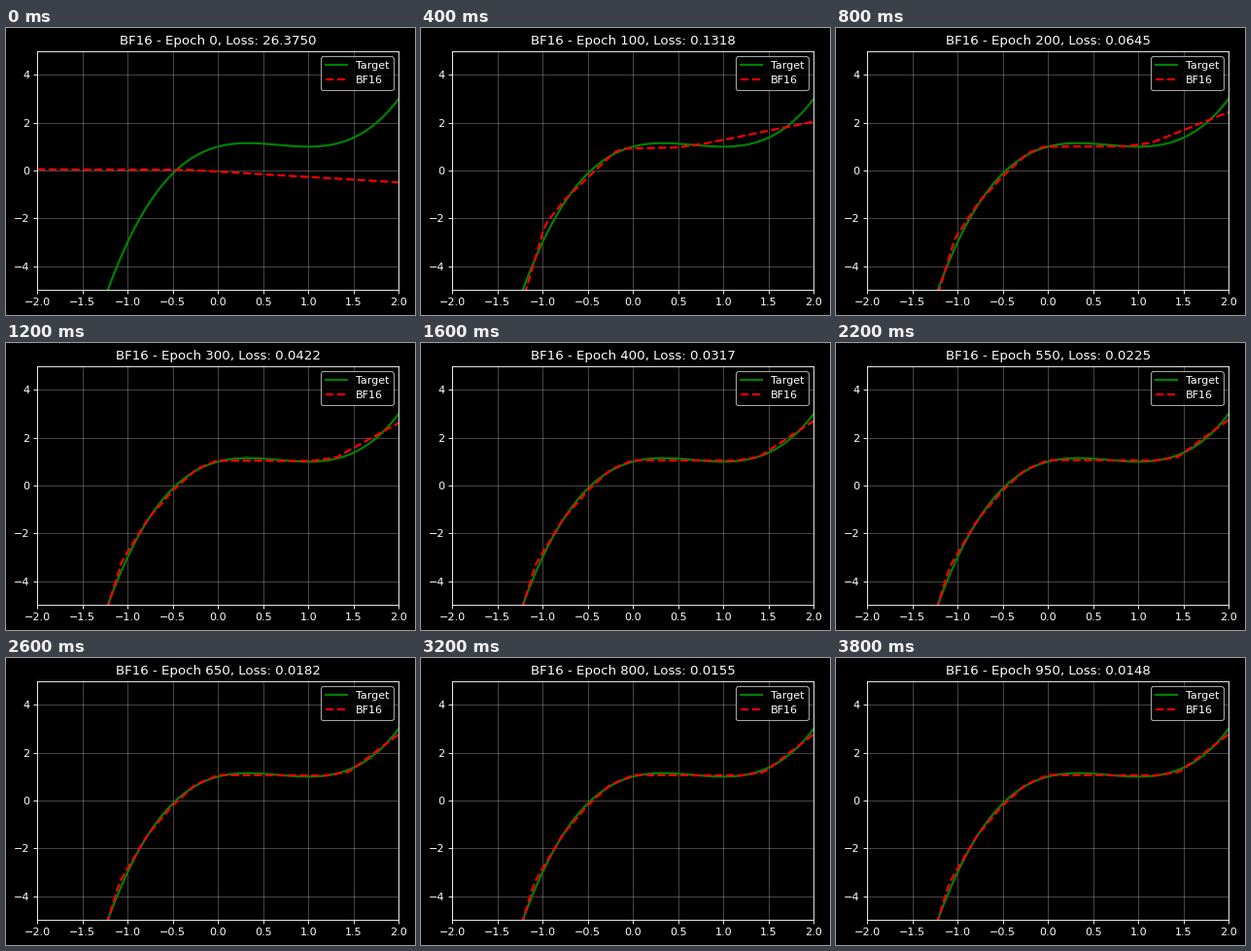
A matplotlib script that plays this animation: 421 by 296 pixels, repeating every 4 s.

```python
import numpy as np
import matplotlib.pyplot as plt
from matplotlib.animation import FuncAnimation

W, H, DPI = 421, 296, 80
FRAMES, STEP = 20, 50

# Loss readings, joined by straight lines on log-log axes
LOSS = {0: 26.375, 100: 0.1318, 300: 0.0422, 500: 0.0253,
        650: 0.0182, 800: 0.0155, 950: 0.0148}

# Kinks of the piecewise-linear fit: rough at epoch 100, then settled
ROUGH = np.array([(-2, -15.5), (-.97, -2.25), (-.75, -1.2), (-.48, -.22), (-.2, .78),
                  (-.1, .92), (.5, .97), (.78, 1.12), (2, 2.05)])
SETTLED = np.array([(-2, -14.6), (-1.09, -3.43), (-.78, -1.44), (-.5, -.2), (-.25, .66),
                    (.01, 1.07), (1.2, 1.05), (1.46, 1.2), (2, 2.78)])

x = np.linspace(-2, 2, 100)
target = x**3 - 2 * x**2 + x + 1
untrained = 0.02 - 0.015 * x - 0.21 * np.maximum(x + 0.3, 0)


def bf16(v):
    """Round to eight significant bits."""
    m, e = np.frexp(v)
    return np.ldexp(np.round(m * 256) / 256, e)


def loss_at(epoch):
    keys, values = np.array(list(LOSS.items())).T
    return bf16(np.exp(np.interp(np.log1p(epoch), np.log1p(keys), np.log(values))))


def fit_at(epoch):
    rough = min(np.exp((100 - epoch) / 130), 1.5)
    kx, ky = (SETTLED + rough * (ROUGH - SETTLED)).T
    start = np.exp(-epoch / 15)
    return bf16(start * untrained + (1 - start) * np.interp(x, kx, ky))


plt.style.use("dark_background")
plt.rcParams["font.family"] = "DejaVu Sans"
fig = plt.figure(figsize=(W / DPI, H / DPI), dpi=DPI)
ax = fig.add_axes([32.15 / W, 25.78 / H, 372 / W, 246.4 / H])
ax.set(xlim=(-2, 2), ylim=(-5, 5))
ax.set_xticks(np.arange(-2, 2.1, 0.5))
ax.set_yticks(range(-4, 5, 2))
ax.grid(True, alpha=0.3)

ax.plot(x, target, color="green", lw=2, label="Target")
fit, = ax.plot(x, fit_at(0), color="red", ls="--", lw=2, label="BF16")
ax.legend(loc="upper right")
title = ax.set_title("")


def update(frame):
    epoch = frame * STEP
    fit.set_ydata(fit_at(epoch))
    title.set_text(f"BF16 - Epoch {epoch}, Loss: {loss_at(epoch):.4f}")
    return fit, title


anim = FuncAnimation(fig, update, frames=FRAMES, interval=200,
                     repeat=True, repeat_delay=0)
plt.show()
```
